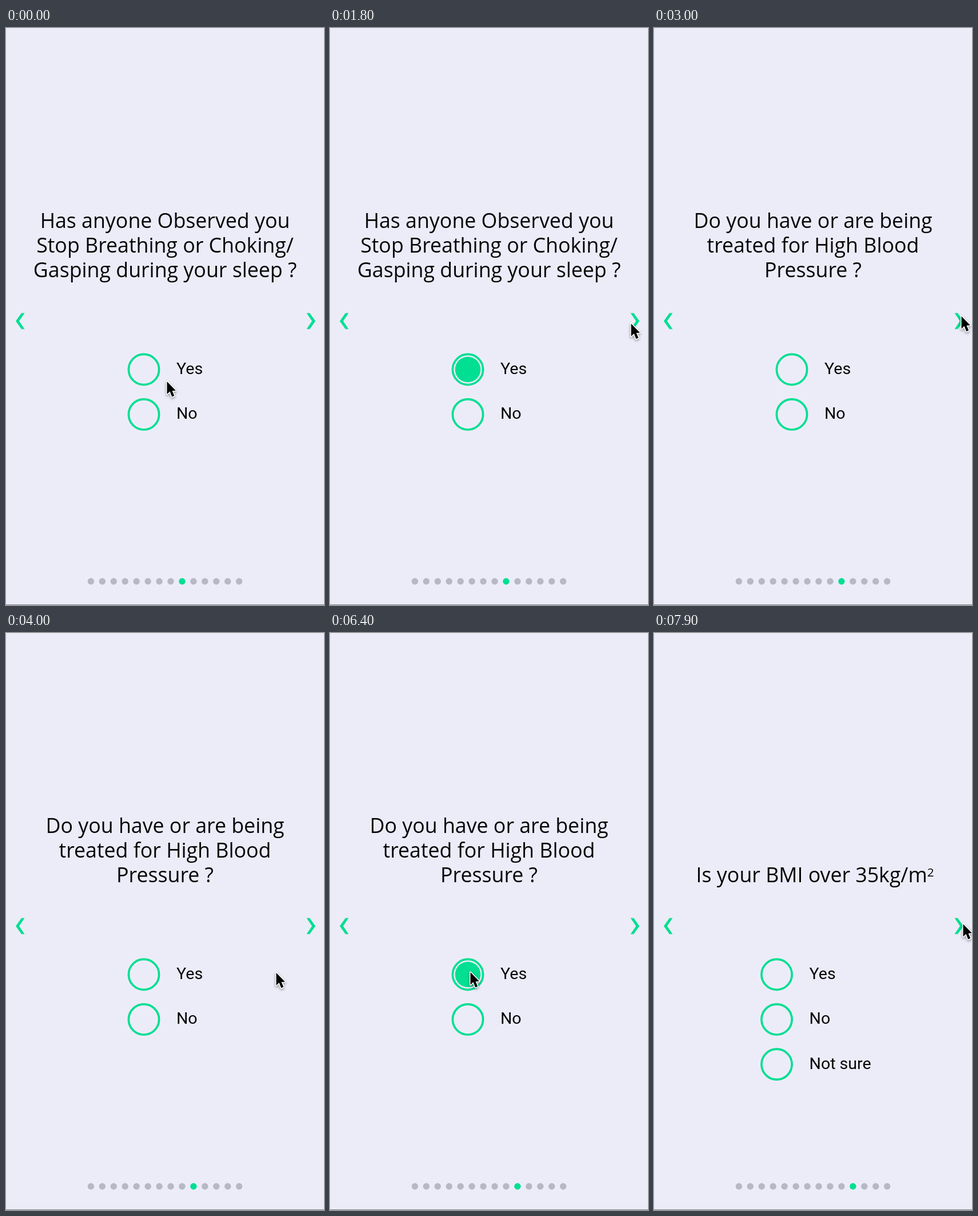
Animation, 556 px wide and 1007 px high, one loop 8 s. Source, as an HTML page with a canvas:

```html
<!DOCTYPE html>
<html lang="en">
<head>
<meta charset="utf-8">
<title>Sleep questionnaire</title>
<style>
  html, body { margin: 0; width: 100%; height: 100%; overflow: hidden; background: #ececf8; }
  canvas { display: block; }
</style>
</head>
<body>
<canvas id="stage" width="556" height="1007"></canvas>
<script>
const W = 556, H = 1007, LOOP = 8000, STEP = 100;
const BG = '#ececf8', GREEN = '#00df92', GREY = '#b8b7c5', INK = '#050507';
const FONT = 35.7, LINE = 43, ROW = 78.4;
const FIRST_DOT = 8, DOTS = 14;
const SLIDE = 225, slides = [2700, 7700];
const ctx = document.getElementById('stage').getContext('2d');

const pages = [
  { lines: ['Has anyone Observed you', 'Stop Breathing or Choking/', 'Gasping during your sleep ?'],
    options: ['Yes', 'No'], x: 241, hover: 300, click: 1200 },
  { lines: ['Do you have or are being', 'treated for High Blood', 'Pressure ?'],
    options: ['Yes', 'No'], x: 241, hover: 5700, click: 6100 },
  { lines: ['Is your BMI over 35kg/m'], sup: '2',
    options: ['Yes', 'No', 'Not sure'], x: 211, hover: LOOP, click: LOOP }
];

const home = { x: 281, y: 615 };
const moves = [
  { from: 0, to: 600, x: 248, y: 598 },
  { from: 1300, to: 1800, x: 526, y: 514 },
  { from: 1800, to: 2400, x: 537, y: 501 },
  { from: 3000, to: 3400, x: 514, y: 501 },
  { from: 3999, to: 4000, x: 472, y: 591 },
  { from: 4800, to: 5700, x: 245, y: 590, dip: 24 },
  { from: 6400, to: 7000, x: 540, y: 506 }
];

const ramp = (t, from, to) => Math.min(1, Math.max(0, (t - from) / (to - from)));
const smooth = p => p * p * (3 - 2 * p);
const easeOut = p => 1 - Math.pow(1 - p, 2.3);

function pointerAt(t) {
  let { x, y } = home;
  for (const m of moves) {
    const p = smooth(ramp(t, m.from, m.to));
    x += (m.x - x) * p;
    y += (m.y - y) * p + (m.dip || 0) * Math.sin(Math.PI * p);
  }
  return [x, y];
}

const fillAt = (page, t) =>
  .35 * ramp(t, page.hover, page.hover + 300) + .65 * ramp(t, page.click, page.click + 200);

// The arrow dims under the pointer and recovers once clicked
const arrowAlpha = t => slides.reduce((alpha, click) =>
  alpha - .8 * (ramp(t, click - 500, click - 100) - ramp(t, click, click + 200)), 1);

function disc(x, y, r, color) {
  ctx.beginPath();
  ctx.arc(x, y, r, 0, 2 * Math.PI);
  ctx.fillStyle = color;
  ctx.fill();
}

function polygon(points) {
  ctx.beginPath();
  points.forEach(([x, y]) => ctx.lineTo(x, y));
  ctx.closePath();
}

function text(string, x, y, size, family) {
  ctx.font = `${size}px ${family}`;
  ctx.fillStyle = INK;
  ctx.fillText(string, x, y);
  return ctx.measureText(string).width;
}

function radio(x, y, fill) {
  ctx.beginPath();
  ctx.arc(x, y, 26.6, 0, 2 * Math.PI);
  ctx.lineWidth = 3.7;
  ctx.strokeStyle = GREEN;
  ctx.stroke();
  ctx.globalAlpha = fill;
  disc(x, y, 22.3, GREEN);
  ctx.globalAlpha = 1;
}

function heading({ lines, sup }) {
  const family = '"Open Sans", sans-serif', supSize = FONT * .58;
  ctx.font = `${supSize}px ${family}`;
  const supWidth = sup ? ctx.measureText(sup).width : 0;
  lines.forEach((line, i) => {
    ctx.font = `${FONT}px ${family}`;
    const x = (W - ctx.measureText(line).width - supWidth) / 2;
    const y = 435 - LINE * (lines.length - 1 - i);
    const width = text(line, x, y, FONT, family);
    if (sup) text(sup, x + width, y - 10, supSize, family);
  });
}

function drawPage(page, dx, t) {
  ctx.save();
  ctx.translate(dx, 0);
  heading(page);
  page.options.forEach((label, i) => {
    const y = 596 + ROW * i;
    text(label, page.x + 57, y + 8, FONT * .8, 'Roboto, sans-serif');
    radio(page.x, y, i ? 0 : fillAt(page, t));
  });
  ctx.restore();
}

function arrow(dir, alpha) {
  const points = [[246.5, -14], [252, -14], [262, 0], [252, 14], [246.5, 14], [256, 0]];
  polygon(points.map(([x, y]) => [279 + dir * x, 511.5 + y]));
  ctx.globalAlpha = alpha;
  ctx.fillStyle = GREEN;
  ctx.fill();
  ctx.globalAlpha = 1;
}

function pointer(x, y) {
  ctx.save();
  ctx.translate(x + .5, y + 2);
  ctx.scale(.9, .9);
  polygon([[0, 0], [0, 24.5], [5.6, 19.3], [9.6, 29.5], [14.2, 27.6], [10, 18], [17, 17.6]]);
  ctx.lineJoin = 'round';
  ctx.lineWidth = 3.4;
  ctx.strokeStyle = '#fff';
  ctx.shadowColor = 'rgba(0,0,0,.4)';
  ctx.shadowBlur = 4;
  ctx.shadowOffsetY = 2;
  ctx.stroke();
  ctx.shadowColor = 'transparent';
  ctx.fillStyle = '#000';
  ctx.fill();
  ctx.restore();
}

function draw(t) {
  ctx.fillStyle = BG;
  ctx.fillRect(0, 0, W, H);

  const shift = slides.reduce((sum, start) => sum + easeOut(ramp(t, start, start + SLIDE)), 0);
  pages.forEach((page, i) => {
    const dx = (i - shift) * W;
    if (Math.abs(dx) < W) drawPage(page, dx, t);
  });

  const active = FIRST_DOT + slides.filter(start => t > start).length;
  for (let i = 0; i < DOTS; i++) {
    disc(148.4 + 19.94 * i, 965.7, 5.7, i === active ? GREEN : GREY);
  }

  arrow(-1, 1);
  arrow(1, arrowAlpha(t));
  ctx.fillStyle = '#7c7c84';
  ctx.fillRect(0, H - 1, W, 1);
  pointer(...pointerAt(t));
}

// The picture advances ten times a second
const begin = performance.now();
function tick() {
  const t = (performance.now() - begin) % LOOP;
  draw(Math.floor(t / STEP) * STEP);
  requestAnimationFrame(tick);
}
tick();
</script>
</body>
</html>
```
